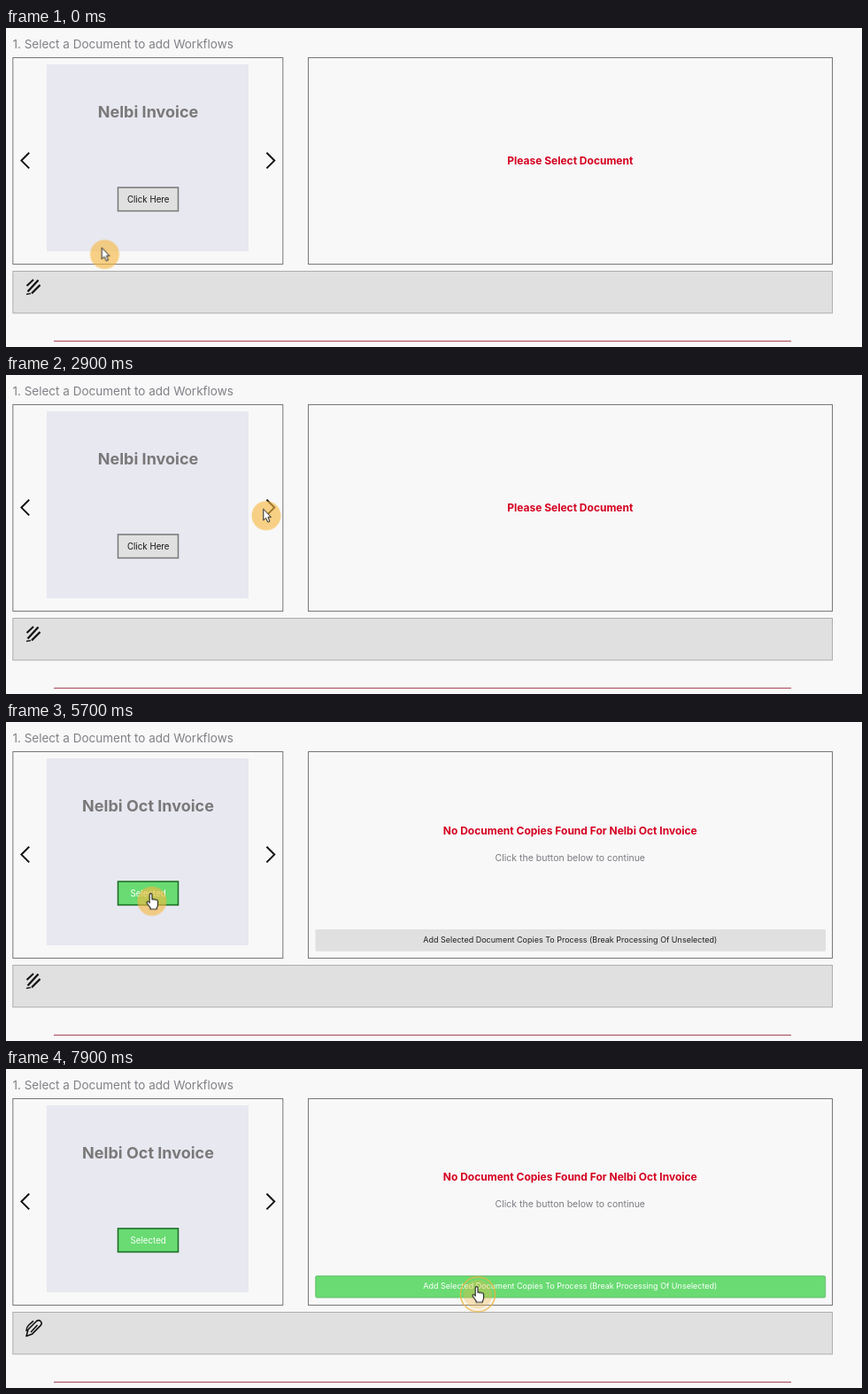
Animation of 967 by 360 pixels, one loop 8000 ms. Source, as an HTML page:

```html
<!DOCTYPE html>
<html lang="en">
<head>
<meta charset="utf-8">
<title>Select a document</title>
<style>
  html, body { margin: 0; width: 100%; height: 100%; overflow: hidden; background: #f8f8f8; }
  svg { display: block; width: 100vw; height: 100vh; }
  text { font-family: Inter, sans-serif; text-anchor: middle; }
  .heading { font-size: 13.5px; fill: #808087; text-anchor: start; }
  .title { font-size: 18px; font-weight: 700; fill: #7a7878; }
  .alert { font-size: 12px; font-weight: 700; fill: #d50020; }
  .note { font-size: 10.5px; fill: #7b7b82; }
  .label { font-size: 9.75px; fill: #151518; }
  .wide { font-size: 9px; fill: #202024; }
  .light { fill: #fff; }
  .frame { fill: none; stroke: #77777b; }
  .choice { fill: #e0e0e0; stroke: #777; stroke-width: 1.5; }
  .chosen { fill: #69db72; stroke: #176a20; stroke-width: 1.5; }
  .chevron { fill: none; stroke: #111; stroke-width: 2; }

  .step { animation: 8s step-end infinite; }
  .first { animation-name: first; }
  .idle { animation-name: idle; }
  .hover { animation-name: hover; }
  .selected, .copies { animation-name: selected; }
  .prompt { animation-name: prompt; }
  .lift { animation-name: lift; }
  .ready { animation-name: ready; }
  .active { animation-name: active; }
  .pen-a { animation-name: penA; }
  .pen-b { animation-name: penB; }
  .arrow { animation-name: arrow; }
  .hand { animation-name: hand; }
  .second { animation: slide 8s linear infinite; }
  .pointer { animation: travel 8s linear infinite; }
  .halo { fill: #f7b840; animation: press 8s step-end infinite; }
  .ripple { fill: none; stroke: #eeb643; stroke-width: 1.5; animation: ripple 8s linear infinite; }

  @keyframes first { 0% { opacity: 1 } 43.75%, 100% { opacity: 0 } }
  @keyframes idle { 0% { opacity: 1 } 60%, 100% { opacity: 0 } }
  @keyframes hover { 0% { opacity: 0 } 60% { opacity: 1 } 67.5%, 100% { opacity: 0 } }
  @keyframes selected { 0% { opacity: 0 } 67.5%, 100% { opacity: 1 } }
  @keyframes prompt { 0% { opacity: 1 } 67.5%, 100% { opacity: 0 } }
  @keyframes lift { 0% { transform: none } 83%, 100% { transform: translateY(-1px) } }
  @keyframes ready { 0% { opacity: 1 } 83%, 100% { opacity: 0 } }
  @keyframes active { 0% { opacity: 0 } 83%, 100% { opacity: 1 } }
  @keyframes penA { 0% { opacity: 1 } 96.25%, 100% { opacity: 0 } }
  @keyframes penB { 0% { opacity: 0 } 96.25%, 100% { opacity: 1 } }
  @keyframes arrow { 0% { opacity: 1 } 60% { opacity: 0 } 73.5% { opacity: 1 } 83%, 100% { opacity: 0 } }
  @keyframes hand { 0% { opacity: 0 } 60% { opacity: 1 } 73.5% { opacity: 0 } 83%, 100% { opacity: 1 } }
  @keyframes slide {
    0%, 43.74% { transform: translateX(228px); opacity: 0 }
    43.75% { transform: translateX(228px); opacity: 0; animation-timing-function: cubic-bezier(.5,1,.89,1) }
    55%, 100% { transform: none; opacity: 1 }
  }
  @keyframes travel {
    0%, 1.25% { transform: translate(111.5px,255.5px) }
    3.75%, 6.25% { transform: translate(116px,254.5px); animation-timing-function: ease-in-out }
    15%, 17.5% { transform: translate(179.3px,239.5px) }
    28.75% { transform: translate(232px,203px) }
    36.25%, 42.5% { transform: translate(294px,158.7px); animation-timing-function: ease-in-out }
    52.5% { transform: translate(281.8px,186px) }
    57.5% { transform: translate(215px,214px) }
    62.5%, 69% { transform: translate(153px,199px); animation-timing-function: ease-in-out }
    81.25% { transform: translate(325px,245px) }
    93.75%, 100% { transform: translate(533px,254.3px) }
  }
  @keyframes press {
    0% { opacity: .62 }
    41.25% { opacity: .35 }
    45% { opacity: .62 }
    65% { opacity: .35 }
    68.75% { opacity: .62 }
    95.6%, 100% { opacity: .35 }
  }
  @keyframes ripple {
    0%, 41.25% { r: 8px; opacity: 0 }
    41.26% { r: 8px; opacity: 1 }
    45% { r: 22px; opacity: .5 }
    45.01%, 65% { r: 8px; opacity: 0 }
    65.01% { r: 8px; opacity: 1 }
    68.75% { r: 22px; opacity: .5 }
    68.76%, 95.6% { r: 8px; opacity: 0 }
    95.61% { r: 8px; opacity: 1 }
    98.75% { r: 19.5px; opacity: .9 }
    100% { r: 21px; opacity: .7 }
  }
</style>
</head>
<body>
<svg viewBox="0 0 967 360" preserveAspectRatio="none">
  <defs>
    <clipPath id="page"><rect x="46" y="41" width="228" height="211"/></clipPath>
    <rect id="button" x="126.5" y="180" width="68" height="26.5"/>
  </defs>

  <text class="heading" x="7.5" y="23.3">1. Select a Document to add Workflows</text>
  <rect class="frame" x="7.8" y="33.5" width="305" height="233"/>
  <rect class="frame" x="341.5" y="33.5" width="592" height="233"/>
  <rect x="7.8" y="274.5" width="925.7" height="47.3" fill="#e0e0e0" stroke="#adadad"/>
  <path d="M54 353.3H887" stroke="#a03a48"/>

  <!-- document carousel -->
  <rect x="46" y="41" width="228" height="211" fill="#e8e8f1"/>
  <path class="chevron" d="M26.2 140.8l-8.8 8.8 8.8 8.8M294.4 140.8l8.8 8.8-8.8 8.8"/>
  <g clip-path="url(#page)">
    <g class="step first">
      <text class="title" x="160.5" y="100.8">Nelbi Invoice</text>
      <use href="#button" class="choice"/>
      <text class="label" x="160.7" y="196.8">Click Here</text>
    </g>
    <g class="second">
      <text class="title" x="160.5" y="100.8">Nelbi Oct Invoice</text>
      <g class="step idle">
        <use href="#button" class="choice"/>
        <text class="label" x="160.7" y="196.8">Click Here</text>
      </g>
      <g class="step hover">
        <use href="#button" class="chosen"/>
        <text class="label light" x="160.7" y="196.8">Click Here</text>
      </g>
      <g class="step selected">
        <use href="#button" class="chosen"/>
        <text class="label light" x="160.7" y="196.8">Selected</text>
      </g>
    </g>
  </g>

  <!-- copies panel -->
  <text class="alert step prompt" x="637.3" y="153.7">Please Select Document</text>
  <g class="step copies">
    <g class="step lift">
      <text class="alert" x="637.3" y="127.4">No Document Copies Found For Nelbi Oct Invoice</text>
      <text class="note" x="637.3" y="156.8">Click the button below to continue</text>
      <g class="step ready">
        <rect x="349.5" y="234" width="576.5" height="24.7" rx="1.5" fill="#e0e0e0"/>
        <text class="wide" x="637.3" y="249.3">Add Selected Document Copies To Process (Break Processing Of Unselected)</text>
      </g>
      <g class="step active">
        <rect x="349.7" y="234.5" width="576" height="24.5" rx="1.5" fill="#69db72" stroke="#62b56a" stroke-width=".8"/>
        <text class="wide light" x="637.3" y="249.3">Add Selected Document Copies To Process (Break Processing Of Unselected)</text>
      </g>
    </g>
  </g>

  <!-- pencil -->
  <g class="step pen-a" fill="none" stroke="#111">
    <path d="M23.5 291l7.5-7" stroke-width="2"/>
    <path d="M24.5 297.5l12-13M29 299.5l9.5-9.5" stroke-width="2.3"/>
    <path d="M23 300.5l5-.8" stroke-width="1.3"/>
  </g>
  <g class="step pen-b" fill="none" stroke="#111" stroke-width="1.6" stroke-linejoin="round">
    <path d="M23 301.5l2-7.5 9.5-9.5q2.6-1.8 4.6.2t.3 4.4l-9.6 9.8z"/>
    <path d="M28 297l7.5-8M23.3 296q-.8-4 2.4-7l5.2-4.7"/>
  </g>

  <!-- pointer -->
  <g class="pointer">
    <circle class="halo" r="16.5"/>
    <circle class="ripple" r="8"/>
    <path class="step arrow" d="M-3.2-7.5V5.2L-.4 2.6 1.8 7.3 4 6.3 1.9 1.7H5.5Z" fill="#fff" stroke="#222" stroke-width="1" stroke-linejoin="round"/>
    <path class="step hand" d="M-2.8 2V-7q0-1.6 1.4-1.6T0-7V-2q1.2-1 2.3.3 1.3-.8 2.2.5 2-.6 2.1 1.4V4q0 2-1.3 3.6V9H-1.8V7.6L-5.6 2.5q-.8-1.6.4-2.2 1.1-.3 2.4 1.7Z" fill="#fff" stroke="#222" stroke-width="1.1" stroke-linejoin="round"/>
  </g>
</svg>
</body>
</html>
```
